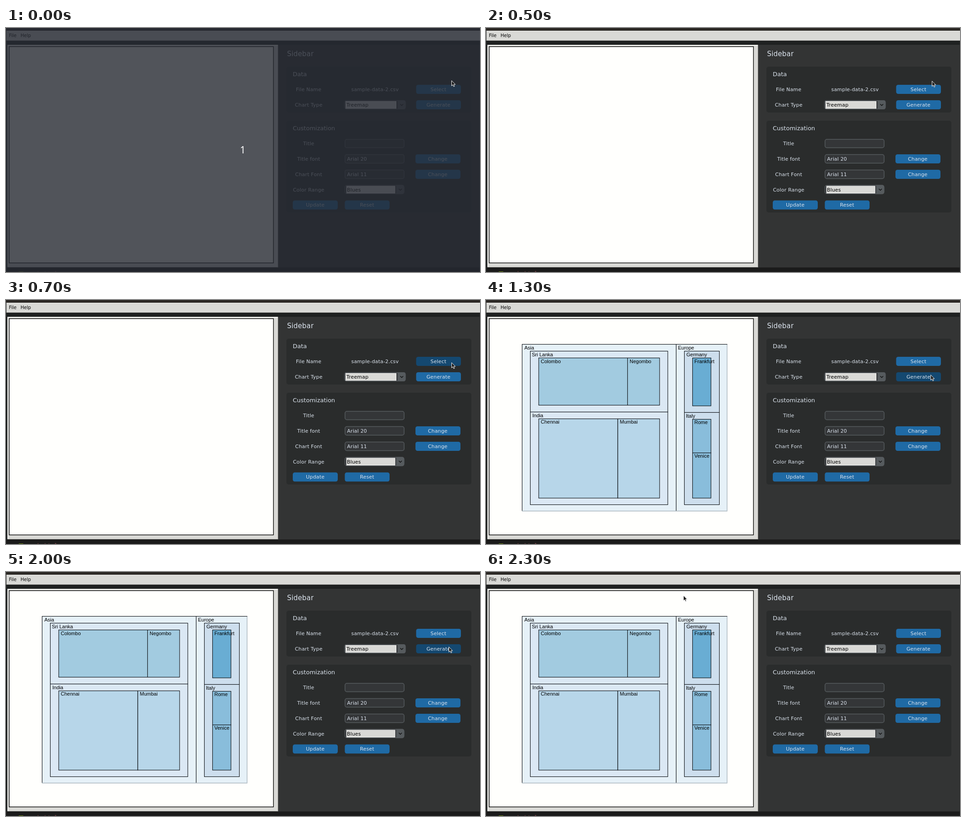
An HTML page that plays this animation: 1043x537 px, repeating every 3.2 s.

```html
<!DOCTYPE html>
<html lang="en">
<head>
<meta charset="utf-8">
<title>Chart builder</title>
<style>
  html, body { margin: 0; width: 100%; height: 100%; overflow: hidden; background: #1d1e1e; }
  svg { display: block; width: 1043px; height: 537px; }
  text { font: 11px "DejaVu Sans", sans-serif; letter-spacing: .17px; fill: #dce4ee; }
  .mid { text-anchor: middle; }
  .h1 { font-size: 15px; }
  .h2 { font-size: 13px; letter-spacing: 0; }
  .menu { font-size: 10px; letter-spacing: 0; fill: #000; }
  .panel { fill: #2a2c2c; }
  .btn { fill: #1f6aa5; }
  .entry { fill: #343638; stroke: #565b5e; stroke-width: 1.5; }
  .grip { fill: #565b5e; }
  .field { fill: #d9d9d6; stroke: #f8f8f6; }
  .pick { fill: #000; }
  .chev { fill: none; stroke: #111; stroke-width: 1.5; }
  .map rect { stroke: #0a0e12; stroke-width: 1.1; }
  .map text { font: 11px "Liberation Sans", Arial, sans-serif; letter-spacing: 0; fill: #000; }

  .count, .map, .cursor, #select, #generate {
    animation: 3200ms step-end infinite;
  }
  .count { animation-name: count; }
  .map { animation-name: map; }
  .cursor { animation-name: move; }
  #select { animation-name: select; }
  #generate { animation-name: generate; }

  @keyframes count { 0% { visibility: visible } 3.125%, 100% { visibility: hidden } }
  @keyframes map { 0% { visibility: hidden } 40.625%, 100% { visibility: visible } }
  @keyframes select { 0% { fill: #1f6aa5 } 21.875% { fill: #144870 } 25%, 100% { fill: #1f6aa5 } }
  @keyframes generate { 0% { fill: #1f6aa5 } 28.125% { fill: #144870 } 65.625%, 100% { fill: #1f6aa5 } }
  @keyframes move {
    0% { transform: translate(980px, 115px) }
    15.625% { transform: translate(981px, 116px) }
    18.75% { transform: translate(981px, 122px) }
    21.875% { transform: translate(980px, 137px) }
    25% { transform: translate(979px, 154px) }
    28.125% { transform: translate(978px, 164px) }
    62.5% { transform: translate(974px, 164px) }
    65.625% { transform: translate(846px, 130px) }
    68.75% { transform: translate(566px, 70px) }
    71.875%, 100% { transform: translate(434px, 51px) }
  }
</style>
</head>
<body>
<svg viewBox="0 0 1043 537">
  <!-- window -->
  <rect width="1043" height="537" fill="#1f2121"/>
  <rect width="1043" height="6" fill="#2c2926"/>
  <rect x="1" y="6" width="1042" height="22" fill="#d9d9d6"/>
  <rect x="1" y="6" width="1042" height="1" fill="#efefec"/>
  <rect x="1" y="27" width="1042" height="1" fill="#a5a5a2"/>
  <text class="menu" x="6.5" y="20">File</text>
  <text class="menu" x="32" y="20">Help</text>
  <rect x="599" y="37" width="443" height="490" fill="#333434"/>
  <rect y="527" width="1043" height="10" fill="#1b1b1b"/>
  <rect x="28" y="536" width="10" height="1" fill="#6b8a14"/>
  <text x="43" y="543" style="font-size:9.6px;letter-spacing:0;fill:#8e4a50">sample-data-1.csv</text>

  <!-- canvas -->
  <rect x="3" y="37" width="596" height="490" fill="#8b8b88"/>
  <rect x="3" y="37" width="595" height="489" fill="#f4f4f1"/>
  <rect x="5" y="39" width="593" height="487" fill="#d9d9d6"/>
  <rect x="7" y="41" width="581.5" height="476" fill="#fffffd" stroke="#000" stroke-width="1.4"/>

  <!-- treemap -->
  <g class="map">
    <g fill="#e6f1f8">
      <rect x="79.5" y="97.5" width="339" height="367"/>
      <rect x="418.5" y="97.5" width="112" height="367"/>
    </g>
    <path d="M79 464.5H530.5V98" fill="none" stroke="#b4c0c8" stroke-width="1.4"/>
    <g fill="#dbe8f4">
      <rect x="97.5" y="112.5" width="302.5" height="134"/>
      <rect x="97.5" y="246.5" width="302.5" height="204"/>
    </g>
    <g fill="#a2cbe0">
      <rect x="116" y="127.5" width="195.5" height="104"/>
      <rect x="311.5" y="127.5" width="70.5" height="104"/>
    </g>
    <g fill="#b7d6e9">
      <rect x="116" y="261.5" width="174" height="174.5"/>
      <rect x="290" y="261.5" width="92" height="174.5"/>
    </g>
    <g fill="#cddeed">
      <rect x="436.5" y="112.5" width="77" height="135"/>
      <rect x="436.5" y="247.5" width="77" height="203"/>
    </g>
    <rect x="454.5" y="127.5" width="40.5" height="105.5" fill="#69add3"/>
    <g fill="#89bddb">
      <rect x="454.5" y="262.5" width="40.5" height="74"/>
      <rect x="454.5" y="336.5" width="40.5" height="99.5"/>
    </g>
    <text x="84.5" y="109">Asia</text>
    <text x="101" y="124">Sri Lanka</text>
    <text x="120.5" y="139">Colombo</text>
    <text x="316" y="139">Negombo</text>
    <text x="102" y="258">India</text>
    <text x="120.5" y="272">Chennai</text>
    <text x="294.5" y="272">Mumbai</text>
    <text x="422.5" y="109">Europe</text>
    <text x="441" y="124">Germany</text>
    <text x="458.5" y="139">Frankfurt</text>
    <text x="440" y="259">Italy</text>
    <text x="458.5" y="273">Rome</text>
    <text x="458.5" y="347">Venice</text>
  </g>

  <!-- sidebar -->
  <text class="h1" x="618.5" y="62">Sidebar</text>
  <rect class="panel" x="617" y="85" width="407" height="101" rx="5"/>
  <rect class="panel" x="617" y="204" width="407" height="202" rx="5"/>
  <text class="h2" x="631" y="106">Data</text>
  <text class="h2" x="631" y="225">Customization</text>

  <g class="mid">
    <text x="666" y="139">File Name</text>
    <text x="812" y="139">sample-data-2.csv</text>
    <text x="666" y="173">Chart Type</text>
    <text x="666" y="258">Title</text>
    <text x="666" y="292">Title font</text>
    <text x="666" y="326">Chart Font</text>
    <text x="666" y="360">Color Range</text>
  </g>

  <g class="btn">
    <rect id="select" x="902.5" y="125" width="98.5" height="20" rx="4.5"/>
    <rect id="generate" x="902.5" y="159" width="98.5" height="20" rx="4.5"/>
    <rect x="901" y="278" width="99" height="20" rx="4.5"/>
    <rect x="901" y="312" width="99" height="20" rx="4.5"/>
    <rect x="631" y="379.5" width="99" height="20" rx="4.5"/>
    <rect x="745.5" y="379.5" width="98.5" height="20" rx="4.5"/>
  </g>
  <g class="mid">
    <text x="951.5" y="139">Select</text>
    <text x="951.5" y="173">Generate</text>
    <text x="950" y="292">Change</text>
    <text x="950" y="326">Change</text>
    <text x="680.5" y="393">Update</text>
    <text x="794.5" y="393">Reset</text>
  </g>

  <g class="entry">
    <rect x="746" y="245" width="130" height="18.5" rx="4"/>
    <rect x="746" y="278.5" width="130" height="19" rx="4"/>
    <rect x="746" y="312.5" width="130" height="19" rx="4"/>
    <rect x="745" y="159.75" width="133.5" height="18.5" rx="4"/>
    <rect x="746" y="346.25" width="129.5" height="18.5" rx="4"/>
  </g>
  <text x="750.5" y="292">Arial 20</text>
  <text x="750.5" y="326">Arial 11</text>

  <path class="grip" d="M861.5 159H875a4.5 4.5 0 0 1 4.5 4.5V174.500a4.5 4.5 0 0 1 -4.500 4.500H861.5Z"/>
  <path class="grip" d="M858.5 345.500H872a4.500 4.500 0 0 1 4.500 4.500V361a4.500 4.500 0 0 1 -4.500 4.500H858.5Z"/>
  <rect class="field" x="747.5" y="161.500" width="111" height="15.500"/>
  <rect class="field" x="749.5" y="348" width="106.500" height="15.500"/>
  <text class="pick" x="749" y="173">Treemap</text>
  <text class="pick" x="750" y="360">Blues</text>
  <path class="chev" d="M867.5 167.500l3.250 3.250 3.250 -3.250M864.500 354l3.250 3.250 3.250 -3.250"/>

  <!-- countdown veil -->
  <g class="count">
    <rect width="1043" height="537" fill="#262a33" fill-opacity=".8"/>
    <text class="mid" x="521" y="276" style="font:21px 'Noto Sans',sans-serif;letter-spacing:0;fill:#fff">1</text>
  </g>

  <path class="cursor" d="M.5 .8V12.300L3.200 9.800L5 14L7 13.200L5.200 9.200H8.700Z" fill="#1c1c1c" stroke="#f4f4f4" stroke-width="1"/>
</svg>
</body>
</html>
```
